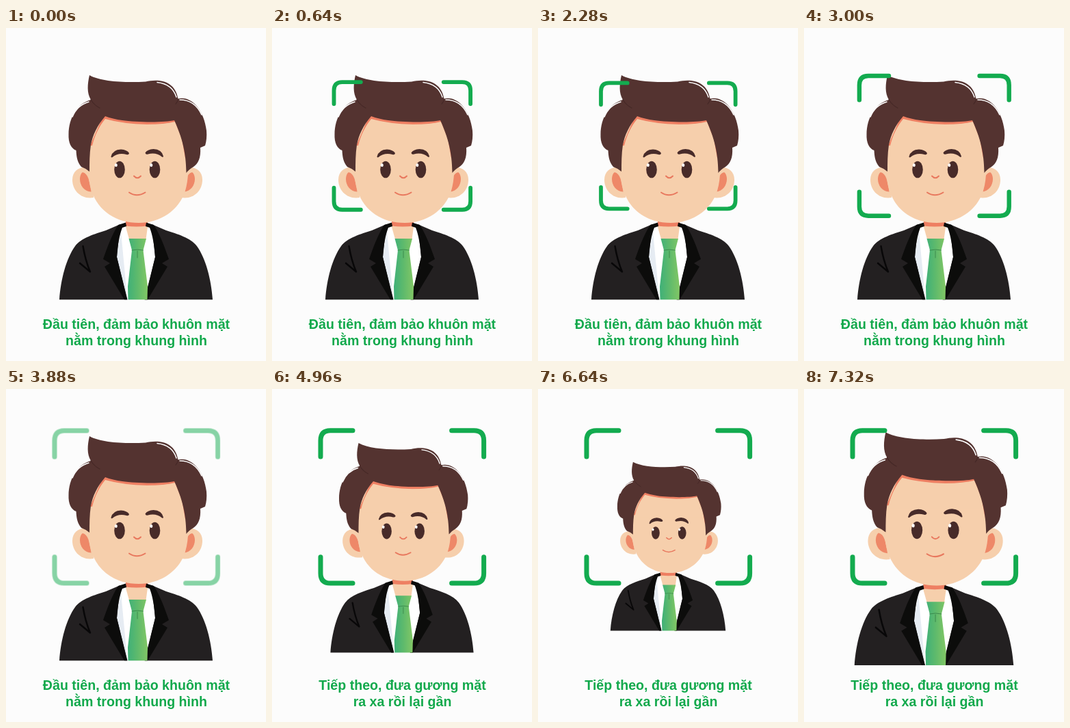
An HTML page that plays this animation: 380 by 487 pixels, repeating every 8000 ms.

```html
<!DOCTYPE html>
<html lang="vi">
<head>
<meta charset="utf-8">
<title>Khuôn mặt</title>
<style>
html, body { margin: 0; width: 100%; height: 100%; overflow: hidden; background: #fcfcfc; }
svg { display: block; width: 100%; height: 100%; }
text { font: bold 19.6px "Liberation Sans", Arial, sans-serif; fill: #12a94c; text-anchor: middle; }
.line { fill: none; stroke-linecap: round; stroke-linejoin: round; }
</style>
</head>
<body>
<svg viewBox="0 0 380 487">
  <defs>
    <linearGradient id="tieFill" x1="0" y1="0" x2="1" y2="0">
      <stop offset="0" stop-color="#3fb078"/>
      <stop offset=".5" stop-color="#5fba6c"/>
      <stop offset="1" stop-color="#82c765"/>
    </linearGradient>
    <path id="corner" class="line" stroke="#13ab4f" stroke-width="7"
      d="M-119.3-73.3V-97Q-119.300-111.600-105-111.600H-72.300"/>
    <g id="ear">
      <path fill="#f6cfac" d="M126 206C112 200 97 206 97 222C97 238 110 251 128 248Z"/>
      <path fill="#ee8868" d="M112 211C120 213 122 223 124.500 239.500C114 239 108 230 108 221C108 216 110 212 112 211Z"/>
    </g>
    <g id="jacketSide">
      <path fill="#232021" d="M78 397.300C80 368 88 337 101 319C110 307 130 301 146 296L167 287L162 335L177 397.300Z"/>
      <path fill="#0c0c0b" d="M175 284.500L164 288C155 302 149 318 142 338L152 344L144 349L173 397.300H177.500L162 335C163 318 166 302 170 292L176 290Z"/>
    </g>
    <path id="eyebrow" fill="#482b29" d="M153.500 188Q156 178 168 177.500Q177 178 180 183Q179.500 186 176 185Q164 182 155.500 189Q153.500 190 153.500 188Z"/>
    <g id="eye">
      <ellipse cx="166" cy="207" rx="7.800" ry="12.300" fill="#482b29"/>
      <ellipse cx="160.800" cy="200.500" rx="2" ry="2.600" fill="#fff"/>
    </g>
  </defs>

  <g id="person">
    <path fill="#fff" d="M168 290L176 286H207L212 290L219 335L206 397H176L161 335Z"/>
    <path fill="#e6ecf3" d="M168 298L161 335L177 393L172 340Z"/>
    <path fill="#f6cfac" d="M175 278H207V291L204.500 309H180L175 291Z"/>
    <path fill="#ee7f62" d="M175 282H207V289.500Q191 291.500 175 289.500Z"/>
    <use href="#jacketSide"/>
    <use href="#jacketSide" transform="matrix(-1 0 0 1 380 0)"/>
    <path fill="url(#tieFill)" d="M179.500 308H205L200.500 325L207 378L206.500 397.300H178.500L178 378L184 325Z"/>
    <path class="line" stroke="#38864a" stroke-width=".9" d="M184 325Q192 323 200.500 325M192 326V336"/>
    <path class="line" stroke="#080708" stroke-width="2.400" d="M112.500 319Q116 340 123 356.500L108 344"/>

    <use href="#ear"/>
    <use href="#ear" transform="matrix(-1 0 0 1 384 0)"/>
    <path fill="#f6cfac" d="M121 180C124 158 131 142 143 130Q194 120 247 132C256 145 263 164 265 182C267 202 267 222 262 238C253 267 225 285 194 285C161 285 135 268 125 238C119 221 120 200 121 180Z"/>
    <path fill="#ee7f62" d="M126 172C130 156 136 144 145 133Q170 140 206 141Q232 141 247 137L257 162L262 190V178L248 131L143 126L123 172Z"/>
    <path fill="#f6cfac" d="M127.500 172C132 156 138 147 147 136.500Q172 141 206 141.500Q228 141.500 240 139Q250 146 257 162L259 178H126Z"/>

    <path fill="#543330" d="M122 69C140 79 176 80 204 78.500C222 74 247 76 251.500 103.500C271 99 289 119 293 150Q294 162 291 172L284 175C285 190 281 198 274 203Q267 207 263.500 212C263 190 261 168 246 135C232 138.500 190 138 170 135Q156 133 145 129C133 143 127 156 124 171C122 184 122 198 122 210Q116 205 110 203C104 196 103 188 102.500 179C95 176 91 168 91.500 155C92 132 103 111 124 105C118 95 119 82 122 69Z"/>
    <g class="line">
      <path stroke="#452826" stroke-width="1.200" d="M124 105Q129 113 137 117M251.500 104Q251 108 248 111"/>
      <path stroke="#fff" stroke-width="1.500" d="M97 130Q104 113 121 108M221 79.500Q243 82 249 101M254 105Q276 105 286 127"/>
    </g>

    <use href="#eyebrow"/>
    <use href="#eyebrow" transform="matrix(-1 0 0 1 383.500 -.5)"/>
    <use href="#eye"/>
    <use href="#eye" x="51.500"/>
    <path class="line" stroke="#e8785e" stroke-width="2" d="M187 216.500Q192 222 197 216.500M180 240.500Q191 248 203.500 240.500"/>
  </g>

  <g id="brackets">
    <use href="#corner"/>
    <use href="#corner" transform="scale(-1 1)"/>
    <use href="#corner" transform="scale(1 -1)"/>
    <use href="#corner" transform="scale(-1 -1)"/>
  </g>

  <text id="line1" x="190.500" y="440"></text>
  <text id="line2" x="190.500" y="463.500"></text>
</svg>
<script>
const LOOP = 8000, STEP = 40;
const get = id => document.getElementById(id);
const person = get("person"), brackets = get("brackets");
const line1 = get("line1"), line2 = get("line2");

// [time, value] pairs, linear in between
const frameSize = [[0, .723], [1400, .971], [2400, .804], [3440, 1]];
const frameAlpha = [[0, 0], [40, 1], [3840, 1], [3920, 0], [4120, 0], [4200, 1]];
const bodySize = [[4760, 1], [5560, .735], [6600, .735], [7320, 1.038]];
const captions = [
  [0, "Đầu tiên, đảm bảo khuôn mặt", "nằm trong khung hình"],
  [3960, "Tiếp theo, đưa gương mặt", "ra xa rồi lại gần"]
];

function at(track, t) {
  const i = track.findIndex(key => key[0] > t);
  if (i === 0) return track[0][1];
  if (i < 0) return track[track.length - 1][1];
  const [t0, a] = track[i - 1], [t1, b] = track[i];
  return a + (b - a) * (t - t0) / (t1 - t0);
}

function draw(t) {
  const s = at(bodySize, t);
  person.setAttribute("transform", `translate(190 221) scale(${s}) translate(-190 -221)`);
  brackets.setAttribute("transform", `translate(190.3 172.4) scale(${at(frameSize, t)})`);
  brackets.setAttribute("opacity", at(frameAlpha, t));
  const [, first, second] = captions[t < captions[1][0] ? 0 : 1];
  if (line1.textContent !== first) {
    line1.textContent = first;
    line2.textContent = second;
  }
}

const start = performance.now();
function tick() {
  const t = (performance.now() - start) % LOOP;
  draw(Math.floor(t / STEP) * STEP);
  requestAnimationFrame(tick);
}
draw(0);
requestAnimationFrame(tick);
</script>
</body>
</html>
```
